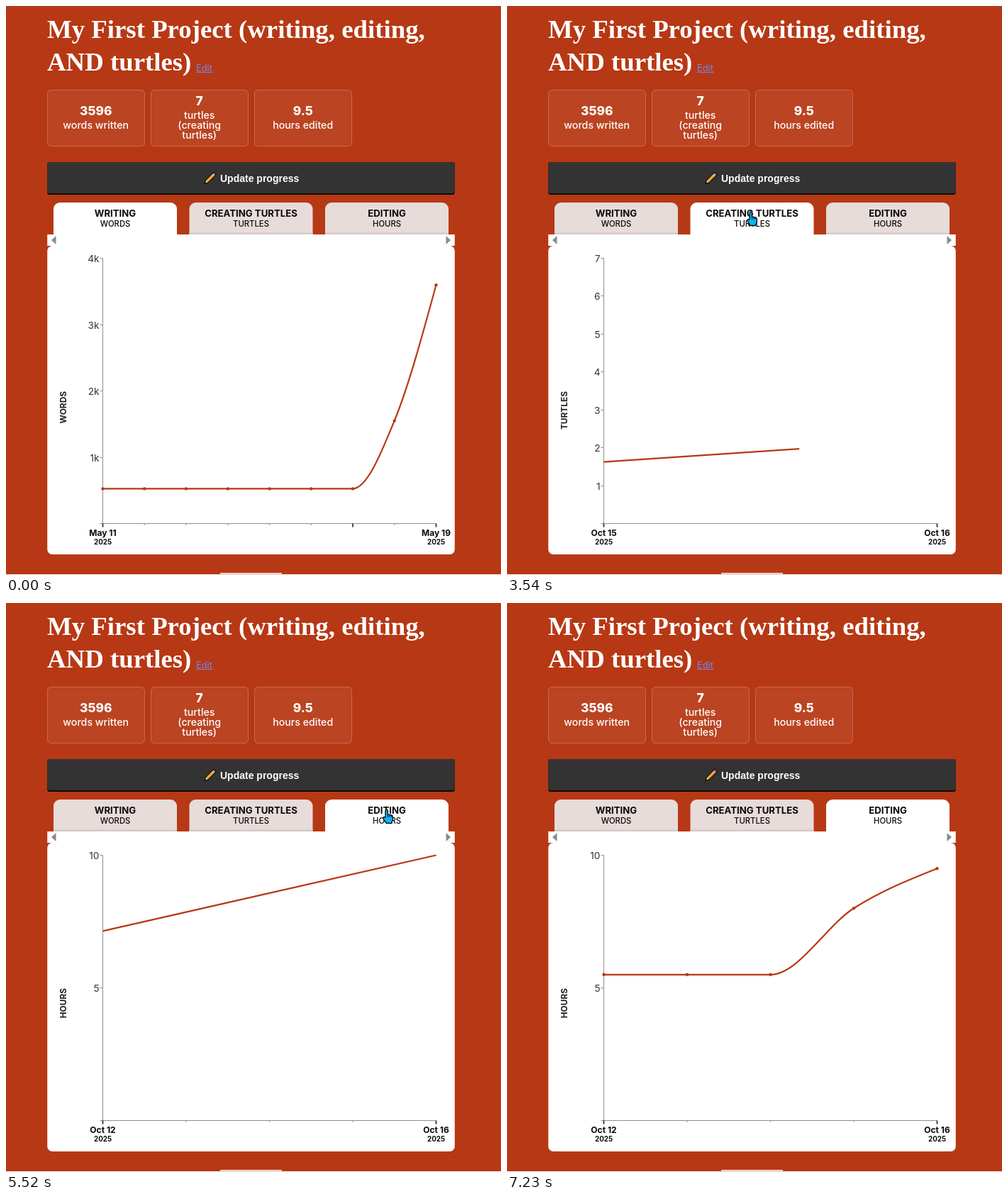
These frames come from a looping animation (698x802 px, 8620 ms). An HTML page with a canvas:

```html
<!DOCTYPE html>
<html lang="en">
<head>
<meta charset="utf-8">
<title>Project progress</title>
<style>
  html, body { margin: 0; width: 100%; height: 100%; overflow: hidden; background: #b73814; }
  canvas { display: block; }
</style>
</head>
<body>
<canvas id="stage" width="698" height="802"></canvas>
<script>
const ctx = document.getElementById('stage').getContext('2d');
const LOOP = 8620, MORPH = 1500, DOTS_AFTER = 1580;
const RED = '#b73814', SANS = 'Inter, "Open Sans", sans-serif';
const LEFT = 136.5, RIGHT = 606.5, TOP = 355.5, BASE = 729.5;
const BOX_X = 58.25, BOX_W = 574.5;

const tabs = [
  { x: 67, name: 'WRITING', unit: 'WORDS', from: 0, morph: -MORPH * 2, max: 4,
    ticks: [1, 2, 3, 4], suffix: 'k', days: ['May 11', 'May 19'], bold: [0, 6, 8],
    data: [.525, .525, .525, .525, .525, .525, .525, 1.55, 3.596] },
  { x: 258.5, name: 'CREATING TURTLES', unit: 'TURTLES', from: 3210, morph: 3325, max: 7,
    ticks: [1, 2, 3, 4, 5, 6, 7], suffix: '', days: ['Oct 15', 'Oct 16'], bold: [0, 1],
    data: [5, 7] },
  { x: 450, name: 'EDITING', unit: 'HOURS', from: 5510, morph: 5634, max: 10,
    ticks: [5, 10], suffix: '', days: ['Oct 12', 'Oct 16'], bold: [0, 4],
    data: [5.5, 5.5, 5.5, 8, 9.5] }
];

const yOf = (tab, v) => BASE - (BASE - TOP) * v / tab.max;
const xOf = (tab, i) => LEFT + (RIGHT - LEFT) * i / (tab.data.length - 1);
for (const tab of tabs) tab.points = tab.data.map((v, i) => [xOf(tab, i), yOf(tab, v)]);

const clamp = u => Math.max(0, Math.min(1, u));
const mix = (a, b, u) => a + (b - a) * u;
const smooth = u => u * u * (3 - 2 * u);
const linear = u => u;
const easeIn = u => u * u;
const easeOut = u => 1 - (1 - u) * (1 - u);

// cubic-bezier(.25, .1, .25, 1)
function ease(u) {
  if (u <= 0 || u >= 1) return clamp(u);
  let lo = 0, hi = 1, s;
  for (let i = 0; i < 24; i++) {
    s = (lo + hi) / 2;
    const x = .75 * s * (1 - s) + s * s * s;
    if (x < u) lo = s; else hi = s;
  }
  return .3 * s * (1 - s) * (1 - s) + 3 * s * s * (1 - s) + s * s * s;
}

// time, x, y, easing towards this stop
const path = [
  [160, 649, 785],
  [900, 164, 325, easeOut],
  [1030, 164, 325],
  [1440, 157, 309],
  [1640, 154, 305],
  [1880, 154, 305],
  [2120, 283, 305],
  [2620, 283, 305],
  [2860, 344, 290],
  [4000, 344, 290],
  [4480, 530, 292],
  [4840, 537, 291],
  [6560, 537, 291],
  [7090, 648, 715, easeIn],
  [7160, 658, 785, linear],
  [7200, 664, 830, linear]
];

const hand = new Path2D('M-2 11V2a1.7 1.7 0 0 1 3.4 0V7l5 1q2 .5 2 2.5v4l-2 5h-7l-3-4-1.6-3.5q.8-2 3.2-1z');
const knuckles = new Path2D('M1.4 7v4M3.8 7.6v3.4M6.2 8v3');
const arrow = new Path2D('M.5 .5V14l3.3-3 2.3 5 2.4-1-2.2-4.8H11z');

function text(str, x, y, size, { weight = 400, color = '#fff', align = 'center', family = SANS } = {}) {
  ctx.font = `${weight} ${size}px ${family}`;
  ctx.fillStyle = color;
  ctx.textAlign = align;
  ctx.fillText(str, x, y);
}

function rect(x, y, w, h, color) {
  ctx.fillStyle = color;
  ctx.fillRect(x, y, w, h);
}

function round(x, y, w, h, r, color) {
  ctx.beginPath();
  ctx.roundRect(x, y, w, h, r);
  ctx.fillStyle = color;
  ctx.fill();
}

function line(x1, y1, x2, y2, color, width = 1) {
  ctx.beginPath();
  ctx.moveTo(x1, y1);
  ctx.lineTo(x2, y2);
  ctx.strokeStyle = color;
  ctx.lineWidth = width;
  ctx.stroke();
}

function triangle(tip, side) {
  ctx.beginPath();
  ctx.moveTo(tip, 330);
  ctx.lineTo(side, 324);
  ctx.lineTo(side, 336);
  ctx.fillStyle = '#8a8a8a';
  ctx.fill();
}

function drawStat(x, value, labels) {
  const y = labels.length > 1 ? 140 : 154;
  round(x, 118, 138, 80, 5, 'rgba(255,255,255,.06)');
  ctx.beginPath();
  ctx.roundRect(x + .5, 118.5, 137, 79, 5);
  ctx.strokeStyle = 'rgba(255,255,255,.2)';
  ctx.lineWidth = 1;
  ctx.stroke();
  text(value, x + 68.7, y, 17.4, { weight: 800 });
  labels.forEach((s, i) => text(s, x + 68.7, y + 19 + i * 14, 14.2, { weight: 450 }));
}

function drawPencil() {
  ctx.save();
  ctx.translate(280, 250.5);
  ctx.rotate(-Math.PI / 4);
  ctx.beginPath();
  ctx.moveTo(0, 0);
  ctx.lineTo(5, -2.4);
  ctx.lineTo(20.5, -2.4);
  ctx.lineTo(20.5, 2.4);
  ctx.lineTo(5, 2.4);
  ctx.closePath();
  ctx.fillStyle = '#f2d3a0';
  ctx.fill();
  rect(5, -2.2, 11, 4.4, '#f5a623');
  rect(16, -2.2, 1.8, 4.4, '#b9b9b9');
  rect(17.8, -2.2, 2.7, 4.4, '#e0776a');
  rect(0, -.7, 2, 1.4, '#111');
  ctx.strokeStyle = '#111';
  ctx.lineWidth = 1.2;
  ctx.stroke();
  ctx.restore();
}

function drawHeader() {
  const serif = { weight: 700, align: 'left', family: '"Liberation Serif", "Noto Serif", serif' };
  text('My First Project (writing, editing,', 58, 45, 36.8, serif);
  text('AND turtles)', 58, 91, 36.8, serif);
  text('Edit', 268, 91.5, 12.8, { color: '#7287ee', align: 'left' });
  line(268, 93.5, 291.5, 93.5, '#7287ee');

  drawStat(58, '3596', ['words written']);
  drawStat(204, '7', ['turtles', '(creating', 'turtles)']);
  drawStat(350, '9.5', ['hours edited']);

  round(BOX_X, 220, BOX_W, 46, 3, '#0c0c0c');
  round(BOX_X, 220, BOX_W, 44, 3, '#333');
  drawPencil();
  text('Update progress', 302, 248, 14,
    { weight: 700, align: 'left', family: '"Liberation Sans", Arial, sans-serif' });
}

function drawTabs(active) {
  for (const tab of tabs) {
    const on = tab === active, mid = tab.x + 87;
    round(tab.x, 277, 174, 45, [9, 9, 0, 0], on ? '#fff' : '#e7dcd9');
    if (!on) rect(tab.x, 319.5, 174, 2.5, '#d6cac7');
    text(tab.name, mid, 297, 13.2, { weight: 700, color: '#0a0a0a' });
    text(tab.unit, mid, 311, 11.3, { weight: 500, color: '#0a0a0a' });
  }
  rect(BOX_X, 322, BOX_W, 16, '#fff');
  round(BOX_X, 338, BOX_W, 435, 7, '#fff');
  triangle(64, 70.5);
  triangle(627, 620.5);
}

function drawAxes(tab) {
  const grey = '#8f8f8f';
  for (const v of tab.ticks) {
    const y = Math.round(yOf(tab, v) - .5) + .5;
    line(132.5, y, LEFT, y, grey);
    text(v + tab.suffix, 131.5, y + 5, 13.7, { color: '#333', align: 'right' });
  }
  line(LEFT, TOP, LEFT, BASE, grey);
  line(132.5, BASE, RIGHT, BASE, grey);
  tab.points.forEach(([x], i) => {
    const major = tab.bold.includes(i);
    line(x, BASE, x, BASE + (major ? 5 : 2.5), major ? '#111' : grey, major ? 1.5 : 1);
  });
  [LEFT, RIGHT].forEach((x, i) => {
    text(tab.days[i], x, 746.5, 12, { weight: 700, color: '#0a0a0a' });
    text('2025', x, 758.7, 9.8, { weight: 700, color: '#0a0a0a' });
  });
  ctx.save();
  ctx.translate(84.5, 543);
  ctx.rotate(-Math.PI / 2);
  text(tab.unit, 0, 0, 11.9, { weight: 700, color: '#222', align: 'right' });
  ctx.restore();
}

// Tangents of a monotone cubic through the points
function tangents(pts) {
  const n = pts.length;
  const h = [], s = [];
  for (let i = 0; i < n - 1; i++) {
    h[i] = pts[i + 1][0] - pts[i][0];
    s[i] = (pts[i + 1][1] - pts[i][1]) / h[i];
  }
  if (n === 2) return [s[0], s[0]];
  const m = [];
  for (let i = 1; i < n - 1; i++) {
    const p = (s[i - 1] * h[i] + s[i] * h[i - 1]) / (h[i - 1] + h[i]);
    m[i] = (Math.sign(s[i - 1]) + Math.sign(s[i])) *
      Math.min(Math.abs(s[i - 1]), Math.abs(s[i]), Math.abs(p) / 2);
  }
  m[0] = (3 * s[0] - m[1]) / 2;
  m[n - 1] = (3 * s[n - 2] - m[n - 2]) / 2;
  return m;
}

function drawCurve(points) {
  const pts = points.filter((p, i) => !i || p[0] - points[i - 1][0] > .01);
  const m = tangents(pts);
  ctx.beginPath();
  ctx.moveTo(...pts[0]);
  for (let i = 1; i < pts.length; i++) {
    const [x0, y0] = pts[i - 1], [x1, y1] = pts[i], d = (x1 - x0) / 3;
    ctx.bezierCurveTo(x0 + d, y0 + d * m[i - 1], x1 - d, y1 - d * m[i], x1, y1);
  }
  ctx.strokeStyle = RED;
  ctx.lineWidth = 2.2;
  ctx.stroke();
}

// Each point starts from the matching point of the chart shown before
function drawSeries(tab, t) {
  const old = tabs[tabs.indexOf(tab) - 1];
  const u = ease(clamp((t - tab.morph) / MORPH));
  const points = tab.points.map(([x, y], i) => {
    if (!old) return [x, y];
    const [ox, oy] = old.points[Math.floor(i * old.points.length / tab.points.length)];
    return [mix(ox, x, u), mix(oy, y, u)];
  });
  drawCurve(points);
  if (t < tab.morph + DOTS_AFTER) return;
  ctx.fillStyle = RED;
  for (const [x, y] of points) {
    ctx.beginPath();
    ctx.arc(x, y, 2.2, 0, Math.PI * 2);
    ctx.fill();
  }
}

function drawPointer(t) {
  const i = path.findIndex(stop => stop[0] > t);
  if (i < 1) return;
  const [t0, x0, y0] = path[i - 1];
  const [t1, x1, y1, fn = smooth] = path[i];
  const u = fn((t - t0) / (t1 - t0));
  const x = mix(x0, x1, u), y = mix(y0, y1, u);
  const over = y > 277 && y < 322 && tabs.some(tab => x > tab.x && x < tab.x + 174);
  const shape = over ? hand : arrow;
  ctx.save();
  ctx.translate(Math.round(x), Math.round(y));
  ctx.fillStyle = '#0fb4f2';
  ctx.strokeStyle = '#06131a';
  ctx.lineJoin = 'round';
  ctx.lineWidth = 1.4;
  ctx.fill(shape);
  ctx.stroke(shape);
  if (over) {
    ctx.lineWidth = .9;
    ctx.stroke(knuckles);
  }
  ctx.restore();
}

function draw(now) {
  const t = now % LOOP;
  const active = tabs.findLast(tab => t >= tab.from);
  rect(0, 0, 698, 802, RED);
  drawHeader();
  drawTabs(active);
  drawAxes(active);
  drawSeries(active, t);
  rect(302, 799, 87, 1.5, '#fff');
  drawPointer(t);
  rect(0, 801, 698, 1, '#fff');
}

const start = performance.now();
function tick() {
  draw(performance.now() - start);
  requestAnimationFrame(tick);
}
tick();
</script>
</body>
</html>
```
